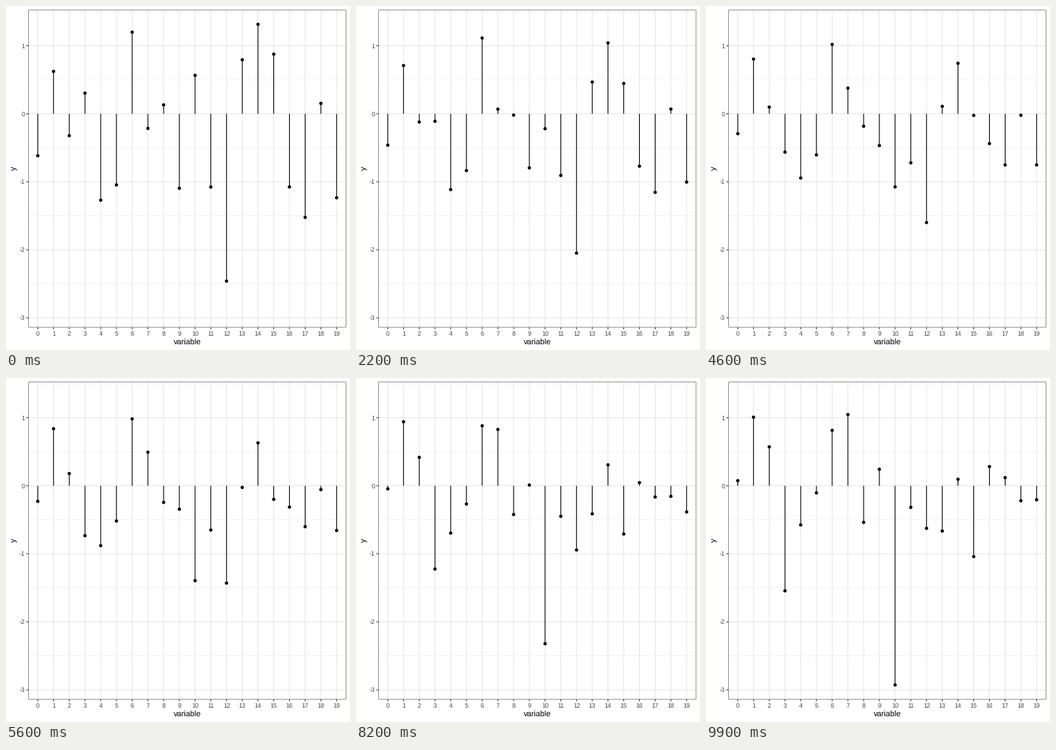
A matplotlib script for the animation above (10000 ms loop, 480 px wide and 480 px high).

```python
import matplotlib.pyplot as plt
import numpy as np
from matplotlib.animation import FuncAnimation
from matplotlib.patches import Circle, Rectangle

SIZE, FRAMES = 480, 100
LEFT, RIGHT, TOP, BOTTOM = 31.2, 474.5, 5.5, 448.4
THICK, THIN = 1.07, 0.53
GRID, DARK, LABEL = "#e7e7e7", "#333333", "#474747"

# Chart data: first and last value of each variable
START = np.array([-0.617, 0.623, -0.322, 0.304, -1.270, -1.046, 1.200,
                  -0.215, 0.131, -1.095, 0.565, -1.077, -2.460, 0.794,
                  1.315, 0.876, -1.075, -1.523, 0.153, -1.234])
END = np.array([0.075, 1.008, 0.573, -1.544, -0.575, -0.104, 0.815,
                1.047, -0.538, 0.243, -2.927, -0.317, -0.625, -0.665,
                0.096, -1.041, 0.282, 0.120, -0.220, -0.206])

plt.rcParams.update({
    "font.family": "Liberation Sans",
    "text.hinting": "none",
    "path.snap": False,
})


def px(i):
    """Horizontal pixel of variable i."""
    return LEFT + (i + 0.6) * (RIGHT - LEFT) / 20.2


def py(v):
    """Vertical pixel of value v."""
    return 150.4 - 94.93 * v


def progress(n):
    """Two linear halves that meet in a one-frame hold."""
    half = FRAMES // 2
    part, step = divmod(n, half)
    return (part + step / (half - 1)) / 2


fig = plt.figure(figsize=(SIZE / 72, SIZE / 72), dpi=72, facecolor="white")
ax = fig.add_axes([0, 0, 1, 1])
ax.set(xlim=(0, SIZE), ylim=(SIZE, 0))
ax.axis("off")


def line(x0, y0, x1, y1, color, width, z):
    return ax.plot([x0, x1], [y0, y1], color=color, lw=width, zorder=z,
                   solid_capstyle="butt")[0]


def label(x, y, s, size, color, ha="center", rotation=0):
    ax.text(x, y, s, size=size, color=color, ha=ha, va="baseline",
            rotation=rotation, rotation_mode="anchor")


# Grid, ticks and labels
for v in np.arange(-2.5, 2):
    line(LEFT, py(v), RIGHT, py(v), GRID, THIN, 1)
for v in range(-3, 2):
    line(LEFT, py(v), RIGHT, py(v), GRID, THICK, 1)
    line(LEFT - 2.75, py(v), LEFT, py(v), DARK, THICK, 2)
    label(LEFT - 4.95, py(v) + 3.15, str(v), 8.8, LABEL, ha="right")
for i in range(len(START)):
    line(px(i), TOP, px(i), BOTTOM, GRID, THICK, 1)
    line(px(i), BOTTOM, px(i), BOTTOM + 2.75, DARK, THICK, 2)
    label(px(i), 459.8, str(i), 8.8, LABEL)
label((LEFT + RIGHT) / 2, 473.3, "variable", 11, "black")
label(14.2, (TOP + BOTTOM) / 2 - 1, "y", 11, "black", rotation=90)

inset = THIN / 2
ax.add_patch(Rectangle((LEFT + inset, TOP + inset),
                       RIGHT - LEFT - THIN, BOTTOM - TOP - THIN,
                       fill=False, ec=DARK, lw=THIN, zorder=5))

# Lollipops
stems, dots = [], []
for i, v in enumerate(START):
    stems.append(line(px(i), py(0), px(i), py(v), "black", THICK, 3))
    dots.append(ax.add_patch(Circle((px(i), py(v)), 2.3, fc="black", lw=0,
                                    zorder=4)))


def update(n):
    values = START + (END - START) * progress(n)
    for i, (stem, dot, v) in enumerate(zip(stems, dots, values)):
        stem.set_ydata([py(0), py(v)])
        dot.center = px(i), py(v)
    return stems + dots


anim = FuncAnimation(fig, update, frames=FRAMES, interval=100, repeat=True,
                     repeat_delay=0, init_func=lambda: update(0))
plt.show()
```
